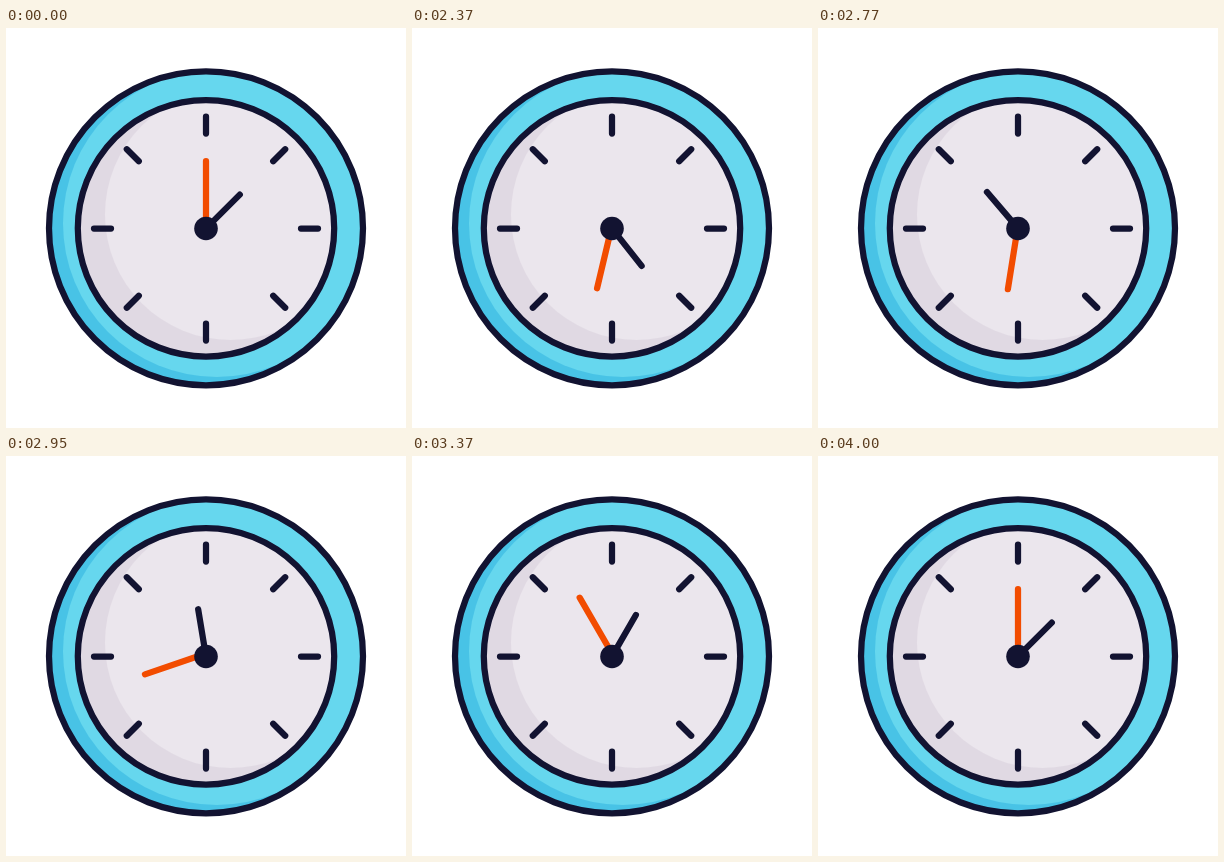
These frames come from a looping animation (400 by 400 pixels, 4020 ms). An HTML page:

```html
<!DOCTYPE html>
<html lang="en">
<head>
<meta charset="utf-8">
<title>Clock</title>
<style>
  html, body { margin: 0; width: 100%; height: 100%; overflow: hidden; background: #fff; }
  svg { display: block; width: 100%; height: 100%; }
  .line { fill: none; stroke: #121331; stroke-width: 6.25; stroke-linecap: round; }
</style>
</head>
<body>
<svg viewBox="0 0 400 400">
  <clipPath id="rim"><circle cx="200" cy="200.3" r="157"/></clipPath>
  <clipPath id="face"><circle cx="200" cy="200.3" r="128.2"/></clipPath>

  <g clip-path="url(#rim)">
    <rect width="400" height="400" fill="#48c3e6"/>
    <circle cx="210.8" cy="195.2" r="153.8" fill="#66d7ee"/>
  </g>
  <g clip-path="url(#face)">
    <rect width="400" height="400" fill="#e0d9e3"/>
    <circle cx="224.5" cy="186.5" r="125.5" fill="#ebe6ed"/>
  </g>

  <g class="line">
    <circle cx="200" cy="200.3" r="157"/>
    <circle cx="200" cy="200.3" r="128.2"/>
    <path d="M200 88.5v17M200 295.5v17M88 200.5h17M295 200.5h17
      M120.8 121.3l12 12M267.2 267.7l12 12M279.2 121.3l-12 12M132.8 267.7l-12 12"/>
    <path id="minute" d="M200 197.5V133" stroke="#f24c00"/>
    <path id="hour" d="M200 200.4V152.6"/>
  </g>
  <circle cx="200" cy="200.5" r="11.8" fill="#121331"/>
</svg>
<script>
  const LOOP = 4020, REST = 2000, TURN = 2000, STEP = 25;
  const minute = document.getElementById('minute');
  const hour = document.getElementById('hour');

  // cubic-bezier(1/3, 0, 0, 1), solved for its parameter by bisection
  function ease(x) {
    if (x <= 0) return 0;
    if (x >= 1) return 1;
    let lo = 0, hi = 1;
    for (let i = 0; i < 30; i++) {
      const u = (lo + hi) / 2;
      if (u * (1 - 2 * u + 2 * u * u) < x) lo = u; else hi = u;
    }
    return lo * lo * (3 - 2 * lo);
  }

  function rotate(hand, angle, pivotY) {
    hand.setAttribute('transform', `rotate(${angle} 200 ${pivotY})`);
  }

  function draw() {
    // the hands advance 40 times a second
    const t = Math.floor((performance.now() % LOOP + 5) / STEP) * STEP;
    const p = ease((t - REST) / TURN);
    rotate(minute, 720 * p, 197.5);
    rotate(hour, 45 + 360 * p, 200.4);
    requestAnimationFrame(draw);
  }
  draw();
</script>
</body>
</html>
```
